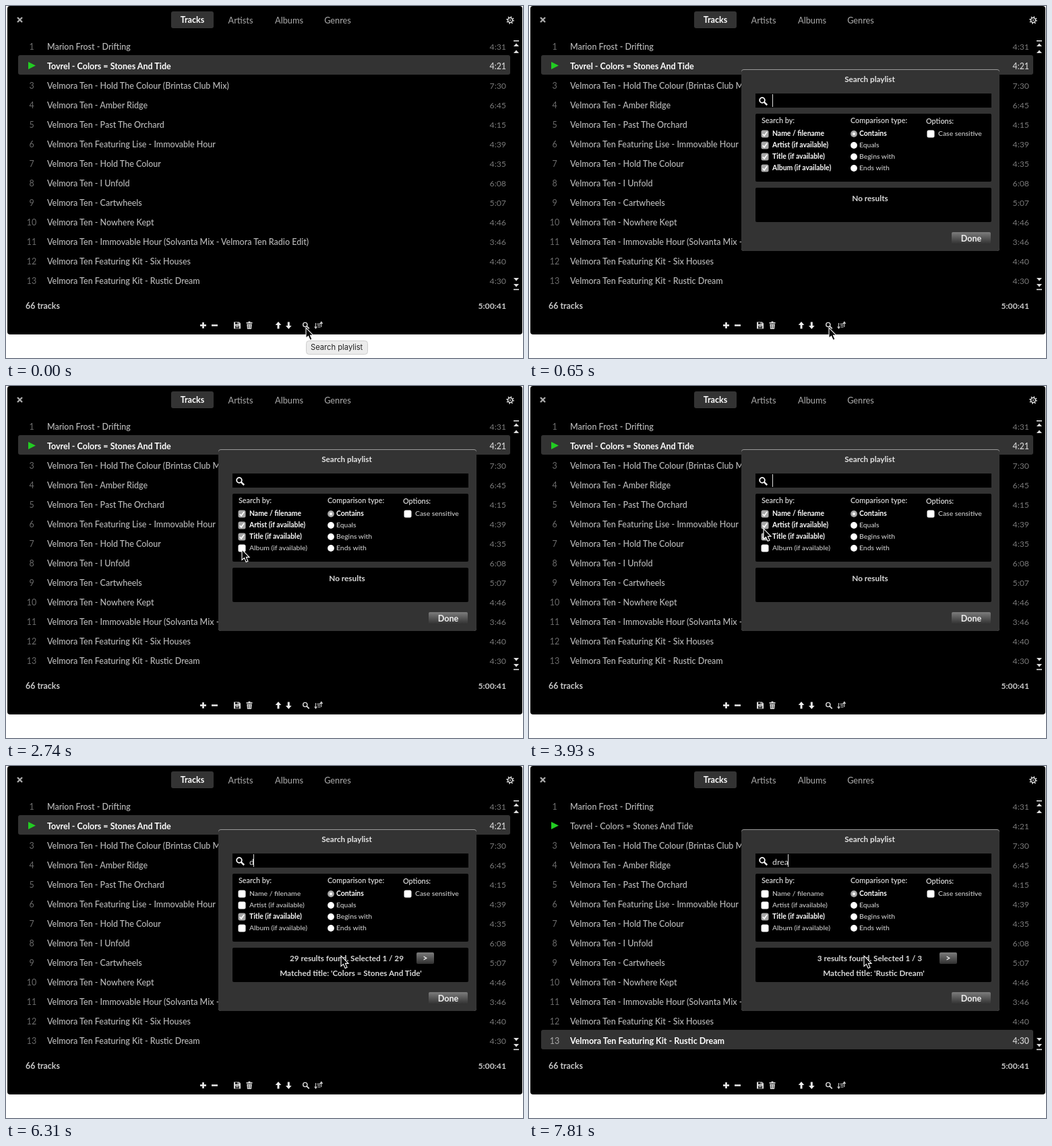
An HTML page for the animation above (8 s loop, 767x523 px).

```html
<!DOCTYPE html>
<html>
<head>
<meta charset="utf-8">
<style>
html, body { margin: 0; width: 100%; height: 100%; overflow: hidden; background: #fff; }
svg { display: block; font-family: Lato, "Open Sans", sans-serif; }
text { white-space: pre; }
</style>
</head>
<body>
<svg id="stage" width="767" height="523" viewBox="0 0 767 523"></svg>
<script>
const LOOP = 8000;
const BAND = 'Velmora Ten';
const tracks = [
  ['Marion Frost - Drifting', '4:31'],
  ['Tovrel - Colors = Stones And Tide', '4:21'],
  [BAND + ' - Hold The Colour (Brintas Club Mix)', '7:30'],
  [BAND + ' - Amber Ridge', '6:45'],
  [BAND + ' - Past The Orchard', '4:15'],
  [BAND + ' Featuring Lise - Immovable Hour', '4:39'],
  [BAND + ' - Hold The Colour', '4:35'],
  [BAND + ' - I Unfold', '6:08'],
  [BAND + ' - Cartwheels', '5:07'],
  [BAND + ' - Nowhere Kept', '4:46'],
  [BAND + ' - Immovable Hour (Solvanta Mix - ' + BAND + ' Radio Edit)', '3:46'],
  [BAND + ' Featuring Kit - Six Houses', '4:40'],
  [BAND + ' Featuring Kit - Rustic Dream', '4:30']
];

// Pointer stops: step, x, y
const stops = [[4, 445, 478], [12, 350, 243], [15, 350, 243], [19, 348, 212],
  [23, 348, 212], [27, 350, 191], [33, 350, 191], [35, 497, 282]];
// Steps at which the text caret switches, starting hidden
const blinks = [1, 5, 9, 13, 16, 19, 23, 27, 31, 35, 39, 48, 49];
// Steps at which one more letter is typed
const keys = [38, 42, 45, 48];
const caretX = [361, 367, 372, 378, 384];

const text = (x, y, s, size, fill, weight = 500, anchor = 'start') =>
  `<text x="${x}" y="${y}" font-size="${size}" fill="${fill}" font-weight="${weight}" text-anchor="${anchor}">${s}</text>`;
const box = (x, y, w, h, fill, r = 0, extra = '') =>
  `<rect x="${x}" y="${y}" width="${w}" height="${h}" rx="${r}" fill="${fill}" ${extra}/>`;
const disc = (x, y, r, fill, extra = '') => `<circle cx="${x}" cy="${y}" r="${r}" fill="${fill}" ${extra}/>`;
const shape = (d, fill, extra = '') => `<path d="${d}" fill="${fill}" ${extra}/>`;
const line = (d, color, width) => shape(d, 'none', `stroke="${color}" stroke-width="${width}"`);
const passed = (list, k) => list.filter(n => k >= n).length;

function pointer(k) {
  const i = stops.findIndex(s => s[0] >= k);
  const b = stops.at(i), a = i > 0 ? stops[i - 1] : b;
  const u = a === b ? 1 : (k - a[0]) / (b[0] - a[0]);
  const e = i < 0 ? 1 : u * u * (3 - 2 * u);
  const x = Math.round(a[1] + (b[1] - a[1]) * e), y = Math.round(a[2] + (b[2] - a[2]) * e);
  return `<g transform="translate(${x} ${y})">` +
    shape('M0 0V15.5L3.5 12.4L6.2 18.5L9 17.2L6.4 11.4H11Z', '#000', 'stroke="#fff" stroke-width="1.1"') + '</g>';
}

function magnifier(x, y, r, color, width) {
  const c = r * .7, h = r * 1.9;
  return disc(x, y, r, 'none', `stroke="${color}" stroke-width="${width}"`) +
    line(`M${x + c} ${y + c}L${x + h} ${y + h}`, color, width * 1.35);
}

function header() {
  let s = box(2, 0, 764, 488, '#000', 4) + line('M17 17L24 24M24 17L17 24', '#aaa', 2.4);
  s += box(245, 8, 63, 25, '#333', 3) + text(276.5, 25, 'Tracks', 12.6, '#fff', 700, 'middle');
  ['Artists', 'Albums', 'Genres'].forEach((name, i) =>
    s += text(348 + 72 * i, 26, name, 12.7, '#a0a0a0', 500, 'middle'));
  return s + disc(748, 21, 3.4, 'none', 'stroke="#ddd" stroke-width="1.5"') +
    disc(748, 21, 4.9, 'none', 'stroke="#ddd" stroke-width="1.8" stroke-dasharray="1.6 2.25"') +
    disc(748, 21, 1, '#ddd');
}

function list(selected) {
  let s = '';
  tracks.forEach(([name, time], i) => {
    const y = 65 + 29 * i, on = i === selected;
    if (on) s += box(18, y - 21, 730, 29, '#333', 3);
    s += i === 1 ? shape('M33 83L44 88.5L33 94Z', '#2c2')
      : text(38, y, i + 1, 12.5, on ? '#aaa' : '#6c6c6c', 400, 'middle');
    s += text(61, y, name, 12.5, on ? '#fff' : '#bcbcbc', on ? 700 : 500);
    s += text(742, y, time, 12.3, on ? '#ccc' : '#787878', on ? 600 : 400, 'end');
  });
  s += box(753, 51, 8, 1.6, '#ddd') + shape('M753 60L757 55.5L761 60ZM753 70L757 65.5L761 70Z', '#ddd');
  return s + shape('M753 404L757 408.5L761 404ZM753 413L757 417.5L761 413Z', '#ddd') + box(753, 420.5, 8, 1.6, '#ddd');
}

function footer() {
  return text(29, 450, '66 tracks', 12.4, '#c8c8c8', 700) + text(742, 450, '5:00:41', 12.2, '#c8c8c8', 700, 'end') +
    line('M288 474.5H297M292.5 470V479M305 474.5H314', '#eee', 2.6) +
    shape('M338 469.5H346L348 471.5V479.5H338Z', '#ddd') +
    box(340, 470, 5.5, 3, '#222') + box(343.5, 470, 1.4, 2.4, '#ddd') + box(340, 475, 6, 4, '#333') +
    box(341, 476, 4, 1, '#ddd') +
    box(356.5, 470, 9, 1.6, '#ddd') + box(359.5, 468.7, 3, 1.5, '#ddd') +
    shape('M357.3 472.5H364.8L364 480H358Z', '#ddd') + line('M359.7 473.5V479M362.3 473.5V479', '#333', .9) +
    shape('M404 469L408.3 474H405.5V479.5H402.5V474H399.7Z', '#eee') +
    shape('M419.3 480L423.6 475H420.8V469.5H417.8V475H415Z', '#eee') +
    magnifier(443.8, 473.5, 3.1, '#ddd', 1.4) +
    line('M459.5 471V478M467.8 470V477', '#ccc', 1.1) +
    shape('M457 476.5H462L459.5 480ZM465.3 472H470.3L467.8 468.3Z', '#ccc') +
    line('M461.5 472.5H466.5M462 474.7H466.5M462.5 477H466.5', '#ccc', 1);
}

function checkbox(x, y, on) {
  return box(x + .5, y + .5, 11, 11, on ? '#a8a8a8' : '#fff', 2.5) +
    (on ? line(`M${x + 2.8} ${y + 6.2}L${x + 5} ${y + 8.8}L${x + 9.2} ${y + 3}`, '#fff', 1.7) : '');
}

function option(x, y, name, on) {
  return text(x, y, name, 10.4, on ? '#fff' : '#ccc', on ? 700 : 500);
}

function button(x, y, w, h, label, cx) {
  return box(x, y, w, h, 'url(#metal)', 2) + text(cx, y + h - 4, label, 12.6, '#f0f0f0', 700, 'middle');
}

function results(typed) {
  if (!typed) return text(506, 290, 'No results', 11.8, '#d8d8d8', 700, 'middle');
  const count = [29, 6, 3, 3][typed - 1];
  const title = tracks[typed > 1 ? 12 : 1][0].split(' - ')[1];
  return text(505.5, 290, `${count} results found. Selected 1 / ${count}`, 11.7, '#d8d8d8', 700, 'middle') +
    text(511.5, 312, `Matched title: '${title}'`, 11.7, '#d8d8d8', 700, 'middle') +
    button(609, 277, 26, 17, '&gt;', 622);
}

function dialog(k, typed) {
  let s = box(315, 94, 383, 270, '#999', 4) + box(315, 95, 383, 269, '#333', 4);
  s += text(505.5, 113, 'Search playlist', 11.7, '#e4e4e4', 700, 'middle');
  s += box(336, 130, 350, 21, '#000') + magnifier(346, 140, 3.8, '#fff', 1.8);
  s += text(361, 147, 'drea'.slice(0, typed), 12.3, '#ccc');
  if (passed(blinks, k) % 2) s += box(caretX[typed], 131, 1, 19, '#ddd');

  s += box(336, 160, 350, 101, '#000', 2);
  [[345, 174, 'Search by:'], [477, 174, 'Comparison type:'], [589, 175, 'Options:']]
    .forEach(([x, y, name]) => s += text(x, y, name, 10.8, '#d8d8d8', 600));
  [['Name / filename', k < 30], ['Artist (if available)', k < 25],
    ['Title (if available)', true], ['Album (if available)', k < 14]]
    .forEach(([name, on], i) => s += checkbox(344, 184 + 17 * i, on) + option(361, 193 + 17 * i, name, on));
  ['Contains', 'Equals', 'Begins with', 'Ends with'].forEach((name, i) => {
    const y = 190 + 17 * i;
    s += disc(482, y, 4.9, i ? '#fff' : '#a8a8a8') + (i ? '' : disc(482, y, 2, '#fff'));
    s += option(490, y + 3, name, !i);
  });
  s += checkbox(590, 184, false) + option(607, 193, 'Case sensitive', false);

  s += box(336, 270, 350, 51, '#000', 2) + results(typed);
  return s + button(627, 336, 58, 18, 'Done', 656);
}

const defs = '<defs><linearGradient id="metal" x2="0" y2="1"><stop stop-color="#7c7c7c"/>' +
  '<stop offset="1" stop-color="#303030"/></linearGradient></defs>';
const tooltip = box(445.5, 497.5, 91, 20, '#ececec', 4, 'stroke="#cfcfcf"') +
  `<g font-family="Inter, sans-serif">${text(452, 511, 'Search playlist', 11.2, '#222', 400)}</g>`;

const stage = document.getElementById('stage');
const start = performance.now();
let shown;

function frame() {
  const t = (performance.now() - start) % LOOP;
  const k = t < 500 ? -1 : Math.floor((t - 490) / 149.1);
  if (k !== shown) {
    shown = k;
    const typed = passed(keys, k);
    stage.innerHTML = defs + header() + list(typed > 1 ? 12 : 1) + footer() +
      (k < 0 ? tooltip : dialog(k, typed)) + pointer(k);
  }
  requestAnimationFrame(frame);
}
frame();
</script>
</body>
</html>
```
